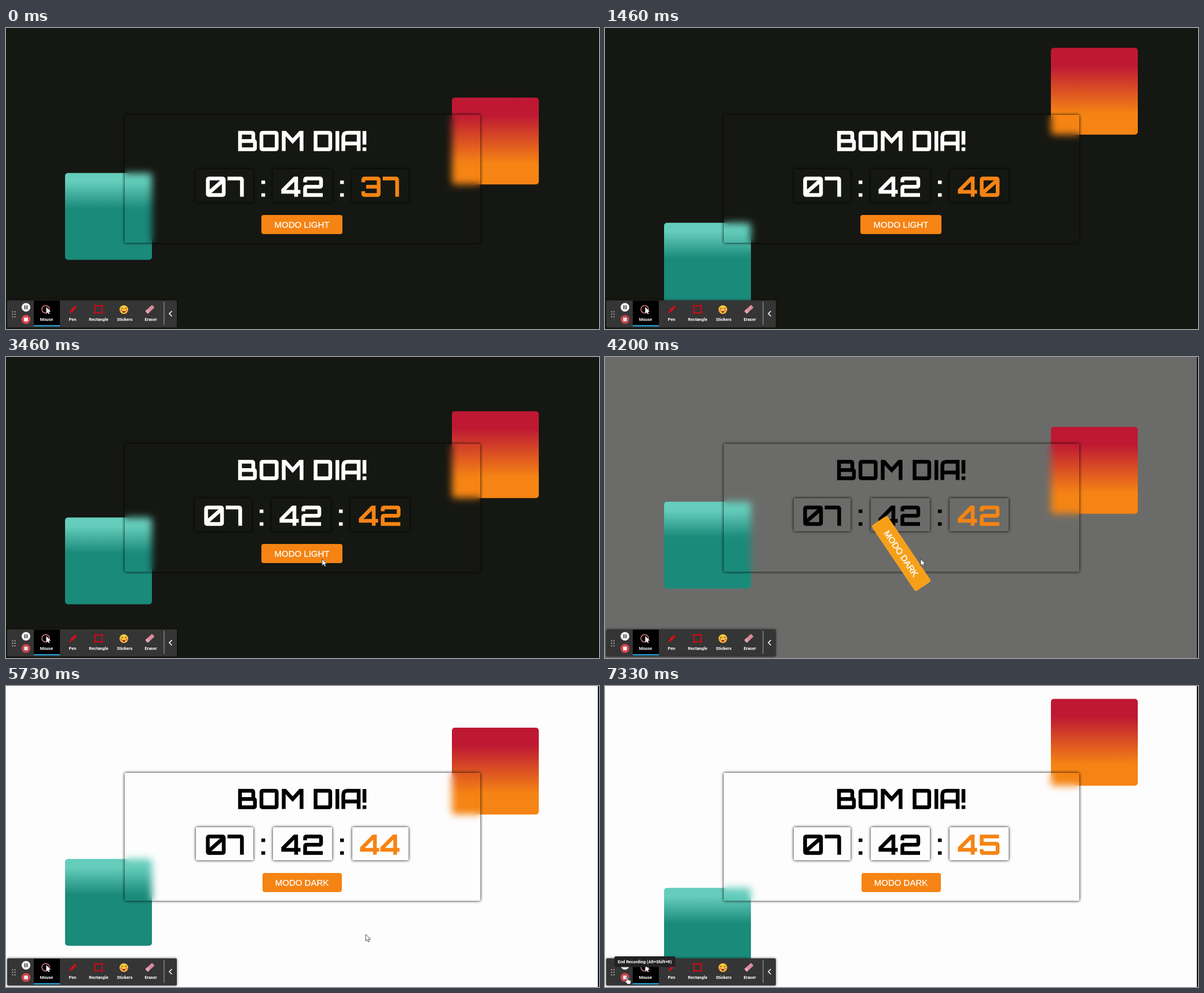
Animation of 1024x520 px, one loop 7.4 s. Source, as an HTML page:

```html
<!DOCTYPE html>
<html lang="pt">
<head>
<meta charset="utf-8">
<title>Bom dia</title>
<style>
  html, body { margin: 0; width: 100%; height: 100%; overflow: hidden; }
  #stage { position: relative; width: 1024px; height: 520px; overflow: hidden; background: #151712; color: #fff; }
  #stage.light { color: #000; }
  #stage > * { position: absolute; }
  svg { display: block; overflow: visible; }
  .edge { right: 0; top: 0; width: 2px; height: 100%; background: #111; }
  .square { top: 0; width: 150px; height: 150px; border-radius: 5px; }
  #red { left: 770px; background: linear-gradient(#be1833 20%, #f58414 76%); }
  #teal { left: 102px; background: linear-gradient(#66cdbc 10%, #1a8a7a 41%); }
  .panel { left: 204.5px; top: 150px; width: 614.5px; height: 221px; border-radius: 2px;
    box-shadow: 0 0 5px #000; backdrop-filter: blur(6.5px); }
  #title { left: 398px; top: 177.5px; }
  #clock { left: 211.6px; top: 244px; width: 600px; display: flex; justify-content: center; }
  #clock > * { padding: 12.5px 0; height: 32px; }
  #clock > .box { padding: 12.5px 13.5px; border-radius: 2px; box-shadow: 0 0 5px #000; }
  .sec { color: #f58414; }
  .glyphs path { fill: none; stroke: currentColor; stroke-width: 6.5; }
  #button { left: 441px; top: 323px; width: 140px; height: 33px; border-radius: 4px; background: #f58414;
    color: #fff; font: 15px/33px "Liberation Sans", Arial, sans-serif; text-align: center; white-space: nowrap;
    -webkit-text-stroke: .25px #fff; }
  .light #button { left: 442.5px; width: 137px; }
  #button.spin { background: #f6a01a; -webkit-text-stroke-width: .5px; }
  #bar { left: 0; top: 0; }
  #bar text { font: 700 7.4px Roboto, sans-serif; fill: #fff; text-anchor: middle; }
  #bar .panelbox { filter: drop-shadow(0 0 2px #0008); }
  #cursor { left: 0; top: 0; width: 1px; height: 1px; }
  #cursor path { fill: #fff; stroke: #222; stroke-width: .8; stroke-linejoin: round; }
</style>
</head>
<body>
<div id="stage">
  <div id="red" class="square"></div>
  <div id="teal" class="square"></div>
  <div class="panel"></div>
  <div id="title"></div>
  <div id="clock"></div>
  <div id="button">MODO LIGHT</div>
  <div class="edge"></div>
  <svg id="bar" width="1024" height="520">
    <rect class="panelbox" x="2" y="470.5" width="293" height="47" rx="2" fill="#353535"/>
    <path d="M11.5 490.2v.01M15.5 490.2v.01M11.5 494.6v.01M15.5 494.6v.01M11.5 499v.01M15.5 499v.01"
      stroke="#ccc" stroke-width="2" stroke-linecap="round"/>
    <circle cx="34.5" cy="482.5" r="7.6" fill="#eee"/>
    <path d="M32.7 479.3v6.4M36.3 479.3v6.4" stroke="#333" stroke-width="1.7"/>
    <g id="stop">
      <circle cx="34.5" cy="503.5" r="7.8" fill="#dc4650"/>
      <rect x="31.2" y="500.2" width="6.6" height="6.6" rx="1" fill="#fff"/>
    </g>
    <rect x="48" y="471" width="45" height="44.5"/>
    <rect x="48" y="513.3" width="45" height="2.2" fill="#29a9e1"/>
    <circle cx="68.5" cy="486" r="6.5" fill="none" stroke="#d77880" stroke-width="1.5"/>
    <path d="M69.5 482v11l2.6-2.3 1.7 3.6 1.7-.8-1.7-3.5h3.5z" fill="#fff"/>
    <path d="M109 493l2-5.2 7.8-8 3.2 3-8 8z" fill="#d8101c"/>
    <path d="M111 487.8l3 3M116.4 482.2l3.2 3.1" stroke="#7c0c12"/>
    <rect x="153.5" y="480" width="12.5" height="12" fill="none" stroke="#c40d18" stroke-width="2.2"/>
    <path d="M153.5 480v.01M166 480v.01M153.5 492v.01M166 492v.01" stroke="#c40d18" stroke-width="3.6" stroke-linecap="round"/>
    <circle cx="203.5" cy="486.5" r="7.5" fill="#fbc93d"/>
    <path d="M198.8 485.3q1.6-2.6 3.2 0M205 485.3q1.6-2.6 3.2 0" fill="none" stroke="#5a3510" stroke-width="1.1"/>
    <path d="M200.5 489h6q-.8 3.2-3 3.2t-3-3.2" fill="#a92a20"/>
    <path d="M198.8 488v.01M208.2 488v.01" stroke="#f0655a" stroke-width="3" stroke-linecap="round"/>
    <g transform="rotate(-43 248.5 486)">
      <rect x="240.5" y="482.8" width="16" height="6.4" rx="1.2" fill="#d98a9c"/>
      <rect x="240.5" y="482.8" width="5" height="6.4" rx="1.2" fill="#e3a3b1"/>
    </g>
    <text x="70" y="505.8">Mouse</text>
    <text x="115" y="505.8">Pen</text>
    <text x="160" y="505.8">Rectangle</text>
    <text x="205" y="505.8">Stickers</text>
    <text x="250" y="505.8">Eraser</text>
    <path d="M273 473v40" stroke="#aaa"/>
    <path d="M286.5 489l-4.5 4.5 4.5 4.5" fill="none" stroke="#fff" stroke-width="1.6"/>
    <g id="tip">
      <rect x="16" y="467" width="105.5" height="18.5" rx="3" fill="#222"/>
      <text x="68.7" y="478.8">End Recording (Alt+Shift+R)</text>
    </g>
  </svg>
  <svg id="cursor">
    <path id="arrow" d="M0 0V11.5L2.7 9 4.6 13.2 6.5 12.3 4.7 8.3H8.3Z"/>
    <path id="hand" d="M-1 0q1.2-1 2 .2V4.5l4.5 1q1.5.5 1.2 2.5L6 12H.5L-3 7.5q-.3-1.6 1.2-1.2L-1 7Z"/>
  </svg>
</div>
<script>
const $ = id => document.getElementById(id);
const stage = $('stage'), LOOP = 7400, CLICK = 4065, HALF = 2500;

// Wide squared letterforms: advance width and centre line
const ring = 'M9 3.1H31.5q2.5 0 2.5 2.5V28.9q0 2.5-2.5 2.5H9q-2.5 0-2.5-2.5V5.6q0-2.5 2.5-2.5Z';
const GLYPHS = {
  0: [40, ring + 'M8 28L32.5 6.5'],
  1: [19, 'M1.5 9L7 3.1H11V34.5'],
  2: [40, 'M6.5 9.5V5.6q0-2.5 2.5-2.5H31.5q2.5 0 2.5 2.5V14.7q0 2.5-2.5 2.5H9q-2.5 0-2.5 2.5V31.4H37'],
  3: [39, 'M6 9.5V5.6q0-2.5 2.5-2.5H30q2.5 0 2.5 2.5V28.9q0 2.5-2.5 2.5H8.5q-2.5 0-2.5-2.5V25M11 17.2H32.5'],
  4: [35, 'M26 34.5V3.1H23.5L3.6 23V26H33.5'],
  5: [40, 'M36.5 3.1H6.5V15.5H31.5q2.5 0 2.5 2.5V28.9q0 2.5-2.5 2.5H9q-2.5 0-2.5-2.5V25'],
  7: [31.5, 'M.5 3.1H22.9q2.5 0 2.5 2.5V34.5'],
  8: [40, ring + 'M6.5 17.2H34'],
  9: [40, 'M34 18.5H9q-2.5 0-2.5-2.5V5.6q0-2.5 2.5-2.5H31.5q2.5 0 2.5 2.5V28.9q0 2.5-2.5 2.5H9q-2.5 0-2.5-2.5V25'],
  ':': [34.5, 'M17.2 6.5v6M17.2 28.5v6'],
  B: [37, 'M6.1 17.2V3.1H26.5q2.5 0 2.5 2.5V17.2M6.1 17.2H29.4q2.5 0 2.5 2.5V28.9q0 2.5-2.5 2.5H6.1Z'],
  O: [38.5, 'M8.6 3.1H29.9q2.5 0 2.5 2.5V28.9q0 2.5-2.5 2.5H8.6q-2.5 0-2.5-2.5V5.6q0-2.5 2.5-2.5Z'],
  M: [43, 'M6.1 34.5V3.1H8.5L21.5 17.5 34.5 3.1H36.9V34.5'],
  D: [37.5, 'M6.1 3.1H28.9q2.5 0 2.5 2.5V28.9q0 2.5-2.5 2.5H6.1Z'],
  I: [12.5, 'M6.2 0V34.5'],
  A: [35.3, 'M4 34.5V10q0-6.9 6.9-6.9H30.5V34.5M4 21.5H30.5'],
  '!': [10.5, 'M5.2 0V23.5M5.2 28.3V34.5'],
  ' ': [12, '']
};

function word(text) {
  let x = 0, paths = '';
  for (const c of text) {
    const [advance, d] = GLYPHS[c];
    paths += `<path transform="translate(${x})" d="${d}"/>`;
    x += advance;
  }
  return `<svg class="glyphs" role="img" aria-label="${text}" width="${x}" height="34.5">${paths}</svg>`;
}

// CSS "ease": cubic-bezier(.25, .1, .25, 1)
function ease(x) {
  if (x <= 0 || x >= 1) return x <= 0 ? 0 : 1;
  let lo = 0, hi = 1, u;
  for (let i = 0; i < 24; i++) {
    u = (lo + hi) / 2;
    if (.75 * u * (1 - u) + u ** 3 < x) lo = u; else hi = u;
  }
  return .3 * u * (1 - u) ** 2 + 3 * u * u * (1 - u) + u ** 3;
}

// Cursor stops: time, x, y
const STOPS = [[2600, 420, 440], [3260, 546, 349], [4200, 545, 349], [4530, 618, 428],
  [5730, 621, 429], [6400, 560, 440], [7060, 38, 503]];

function cursorAt(t) {
  const i = STOPS.findIndex(s => s[0] > t);
  if (i < 0) return STOPS[STOPS.length - 1].slice(1);
  const [t0, x0, y0] = STOPS[i - 1], [t1, x1, y1] = STOPS[i];
  const k = (t - t0) / (t1 - t0), e = k * k * (3 - 2 * k);
  return [x0 + (x1 - x0) * e, y0 + (y1 - y0) * e];
}

function hold(t) {
  const r = t % 200;
  return t - r + (r < 60 ? 0 : r < 130 ? 60 : 130);
}

let shown;
function showClock(sec) {
  if (sec === shown) return;
  shown = sec;
  const box = (n, cls = '') => `<div class="box ${cls}">${word(n)}</div>`;
  const colon = `<div>${word(':')}</div>`;
  $('clock').innerHTML = box('07') + colon + box('42') + colon + box(String(sec), 'sec');
}

function render(ms) {
  const t = hold(ms % LOOP);
  const real = t < 60 ? -830 : t;

  const phase = (real + 35 + 2 * HALF) % (2 * HALF);
  const k = ease(phase % HALF / HALF);
  const y = 127.4 - 105.4 * (phase < HALF ? k : 1 - k);
  $('red').style.transform = `translateY(${y}px)`;
  $('teal').style.transform = `translateY(${370.8 - y}px)`;
  showClock(42 + Math.floor((real - 3395) / 1000));

  const light = t >= CLICK, since = t - CLICK;
  const mix = ease(since / 580);
  stage.classList.toggle('light', light);
  stage.style.backgroundColor = `rgb(${[21, 23, 18].map(c => Math.round(c + (253 - c) * mix))})`;
  const button = $('button');
  button.textContent = light ? 'MODO DARK' : 'MODO LIGHT';
  button.classList.toggle('spin', light && since < 1000);
  button.style.transform = light && since < 1000 ? `rotate(${360 * ease(since / 1000)}deg)` : 'none';

  const visible = t >= STOPS[0][0], over = t >= 7060;
  $('cursor').style.display = visible ? 'block' : 'none';
  if (visible) {
    const [cx, cy] = cursorAt(t);
    $('cursor').style.transform = `translate(${cx}px, ${cy}px)`;
  }
  $('arrow').style.display = over ? 'none' : '';
  $('hand').style.display = over ? '' : 'none';
  $('tip').style.display = over ? '' : 'none';
  $('stop').style.opacity = .92 + .08 * Math.cos(t * Math.PI / 500);
}

$('title').innerHTML = word('BOM DIA!');
const start = performance.now();
(function tick() {
  render(Math.max(0, performance.now() - start));
  requestAnimationFrame(tick);
})();
</script>
</body>
</html>
```
